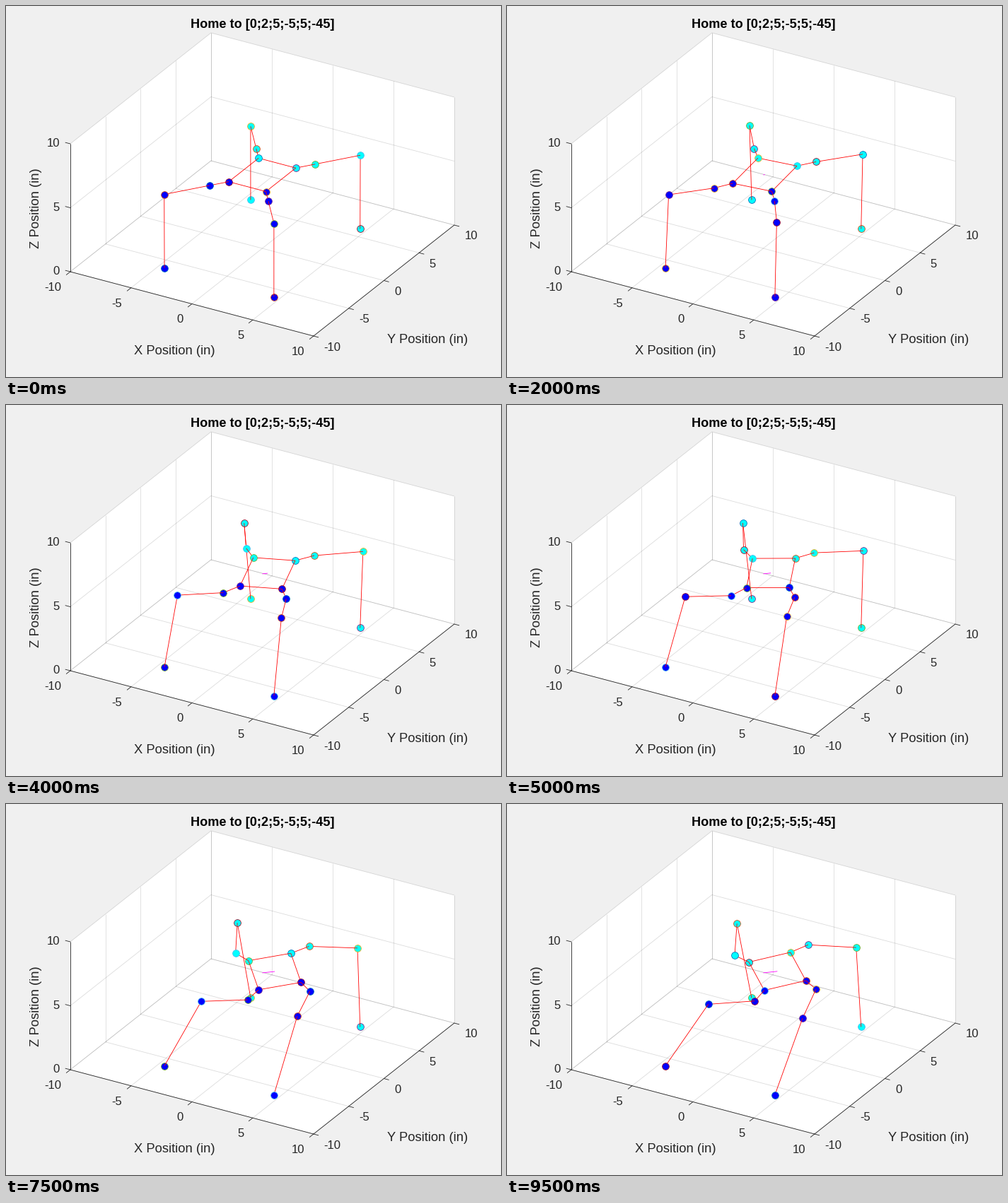
A matplotlib script that plays this animation: 700 by 525 pixels, repeating every 10000 ms.

```python
import numpy as np
import matplotlib.pyplot as plt
from matplotlib.animation import FuncAnimation

plt.rcParams["font.family"] = "Liberation Sans"

W, H, DPI = 700, 525, 100
FRAMES, INTERVAL = 20, 500
PX = 72 / DPI  # one pixel in points
INK = "#262626"
EDGE_CYCLE = ["#0072bd", "#d95319", "#edb120", "#7e2f8e",
              "#77ac30", "#4dbeee", "#a2142f"]

# Orthographic view: screen offset of one unit along x, y and z
VIEW = np.array([[17.2, 4.55], [9.95, -7.85], [0, -18.1]])
ORIGIN = np.array([362.4, 343])
TOWARD_CAMERA = np.array([-0.445, -0.771, 0.457])

# Robot: hip corner, foot spot, link lengths, legs as (x sign, y sign)
LEGS = [(-1, 1), (1, 1), (-1, -1), (1, -1)]
HIP = np.array([1.53, 2.125])
FOOT = np.array([4.5, 6.125])
COXA, FEMUR, TIBIA = 1.5, 3.5, 5.75
START = np.array([0, 0, 5.75])
END = np.array([0, 2, 5])
YAW = np.radians(45)
SLOPE = np.array([0.06, 0.11])  # final body tilt along world x and y
BODY_LOOP = [0, 1, 3, 2, 0]

fig = plt.figure(figsize=(W / DPI, H / DPI), dpi=DPI, facecolor="#f0f0f0")
ax = fig.add_axes([0, 0, 1, 1])
ax.set_xlim(0, W)
ax.set_ylim(H, 0)
ax.axis("off")


def project(points):
    return ORIGIN + np.asarray(points, float) @ VIEW


def depth_order(points):
    return 20 + 0.1 * np.mean(np.atleast_2d(points) @ TOWARD_CAMERA)


def stroke(points, color, alpha=1, zorder=2):
    ax.plot(*project(points).T, color=color, alpha=alpha, lw=0.83 * PX,
            zorder=zorder, solid_capstyle="butt")


def label(x, y, text, size=16.67, color=INK, **kw):
    ax.text(x, y, text, fontsize=size * PX, color=color, va="baseline",
            **{"ha": "center", **kw})


def tick(pos, direction):
    p = project(pos)
    d = np.array(direction) / np.hypot(*direction) * 7
    ax.plot(*np.array([p, p + d]).T, color=INK, lw=0.83 * PX, zorder=4)


def draw_box():
    outline = [(-10, -10, 0), (10, -10, 0), (10, 10, 0),
               (10, 10, 10), (-10, 10, 10), (-10, -10, 10)]
    ax.add_patch(plt.Polygon(project(outline), fc="white", ec="none", zorder=1))

    for v in (-10, -5, 0, 5, 10):
        stroke([(v, -10, 0), (v, 10, 0)], INK, 0.16)
        stroke([(-10, v, 0), (10, v, 0)], INK, 0.16)
        stroke([(v, 10, 0), (v, 10, 10)], INK, 0.16)
        stroke([(-10, v, 0), (-10, v, 10)], INK, 0.16)
    for z in (0, 5, 10):
        stroke([(-10, -10, z), (-10, 10, z), (10, 10, z)], INK, 0.16)

    for end in [(10, -10, 0), (-10, -10, 10)]:
        stroke([(-10, -10, 0), end], INK, zorder=4)
    stroke([(10, -10, 0), (10, 10, 0)], INK, zorder=4)

    for v in (-10, -5, 0, 5, 10):
        tick((v, -10, 0), -VIEW[1])
        tick((10, v, 0), VIEW[0])
        px, py = project((v, -10, 0))
        label(px - 12.5, py + 27, str(v), ha="right")
        px, py = project((10, v, 0))
        label(px + 14.5, py + 20.5, str(v), ha="left")
    for z in (0, 5, 10):
        tick((-10, -10, z), -VIEW[0])
        label(76, project((-10, -10, z))[1] + 4, str(z), ha="right")

    label(363, 31, "Home to [0;2;5;-5;5;-45]", 18.1, "black", weight="bold")
    label(238.5, 493, "X Position (in)", 18.33)
    label(596.5, 477, "Y Position (in)", 18.33)
    label(47, 286, "Z Position (in)", 18.33, rotation=90,
          rotation_mode="anchor")


def pose(s):
    """Body centre and the hip, coxa, knee and foot points of each leg."""
    center = START + s * (END - START)
    c, n = np.cos(s * YAW), np.sin(s * YAW)
    turn = np.array([[c, -n], [n, c]])

    def attach(xy):
        flat = turn @ xy
        return np.append(flat, s * SLOPE @ flat)

    legs = []
    for sign in LEGS:
        hip = center + attach(HIP * sign)
        foot = np.append(FOOT * sign, 0)
        aim = (foot - hip)[:2]
        aim = aim / np.hypot(*aim)
        coxa = hip + attach(COXA * aim)
        # Lift the femur until the tibia just reaches the foot
        reach = foot - coxa
        p, q = reach[:2] @ aim, reach[2]
        k = (reach @ reach + FEMUR**2 - TIBIA**2) / (2 * FEMUR)
        lift = np.arctan2(q, p) + np.arccos(np.clip(k / np.hypot(p, q), -1, 1))
        knee = coxa + FEMUR * np.append(aim * np.cos(lift), np.sin(lift))
        legs.append([hip, coxa, knee, foot])
    return center, np.array(legs)


def make_line(color):
    return ax.plot([], [], color=color, lw=0.83 * PX,
                   solid_capstyle="butt")[0]


def place(artist, points):
    points = np.atleast_2d(points)
    artist.set_data(*project(points).T)
    artist.set_zorder(depth_order(points))


draw_box()
trail = make_line("magenta")
links = [make_line("red") for _ in range(16)]
joints = [ax.plot([], [], "o", ms=9.8 * PX, mew=0.83 * PX,
                  mfc="cyan" if LEGS[j][1] > 0 else "blue")[0]
          for j in range(4) for _ in range(4)]


def update(frame):
    t = frame / (FRAMES - 1)
    center, legs = pose(t * t * (3 - 2 * t))

    segments = [legs[[a, b], 0] for a, b in zip(BODY_LOOP, BODY_LOOP[1:])]
    segments += [leg[k:k + 2] for leg in legs for k in range(3)]
    for line, segment in zip(links, segments):
        place(line, segment)
    place(trail, [START, center])

    for j in range(4):
        for k in range(4):
            marker = joints[4 * j + k]
            place(marker, legs[j, k])
            turn = (3 * j + k if k < 3 else 12 + j) + 4 * frame
            marker.set_markeredgecolor(EDGE_CYCLE[turn % 7])
    return [trail, *links, *joints]


anim = FuncAnimation(fig, update, frames=FRAMES, interval=INTERVAL,
                     repeat=True, repeat_delay=0, blit=False)
plt.show()
```
